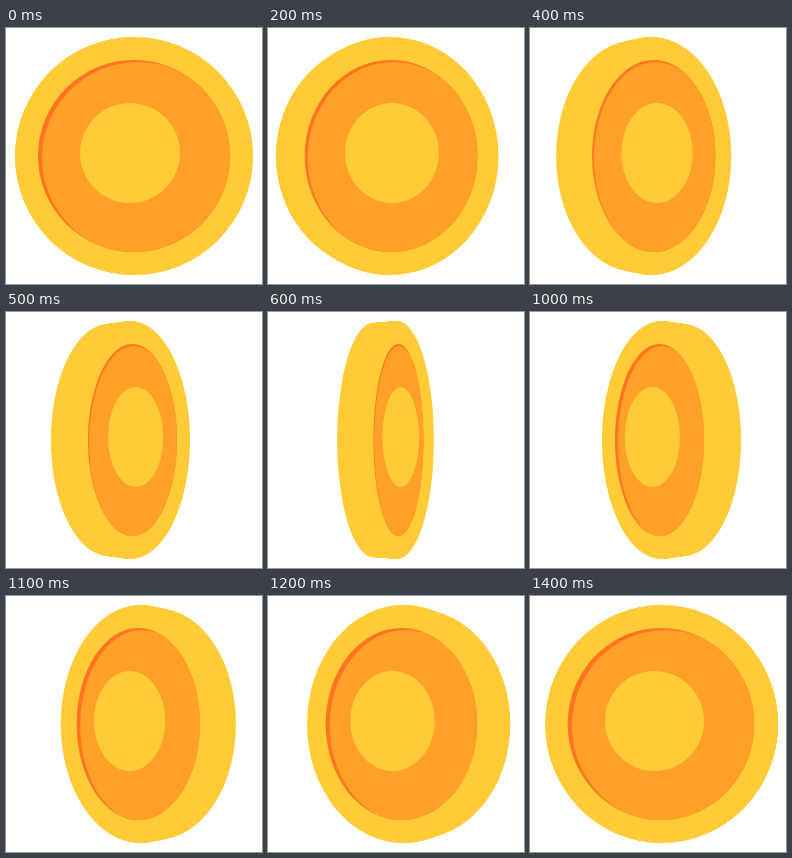
Write an HTML page with a canvas that moves like this. It is 256x256 px and loops after 1500 ms.

```html
<!DOCTYPE html>
<html lang="en">
<head>
<meta charset="utf-8">
<title>Spinning coin</title>
<style>
  html, body { margin: 0; width: 100%; height: 100%; overflow: hidden; background: #fff; }
  canvas { display: block; }
</style>
</head>
<body>
<canvas id="stage" width="256" height="256"></canvas>
<script>
const ctx = document.getElementById('stage').getContext('2d');
const GOLD = '#ffcb37', FLOOR = '#ffa028', SHADE = '#ff7420';
const CENTER = 128, RADIUS = 119, RECESS = 96, MARK = 50;
const THICKNESS = 25, SHRINK = 6, SLICES = 25;
const STEP = 100, STEPS = 15;

function ellipse(x, y, rx, ry, color) {
  ctx.beginPath();
  ctx.ellipse(x, y, rx, ry, 0, 0, 2 * Math.PI);
  ctx.fillStyle = color;
  ctx.fill();
}

function drawCoin(angle) {
  const c = Math.cos(angle), s = Math.sin(angle);
  const side = Math.sign(s), tilt = Math.abs(s);
  const front = CENTER - 13.5 * Math.sin(2 * angle) + 9.5 * s;

  ctx.clearRect(0, 0, 256, 256);

  // body: slices from back to front, smaller with distance
  for (let i = SLICES; i >= 0; i--) {
    const depth = i / SLICES, r = RADIUS - SHRINK * c * depth;
    ellipse(front - THICKNESS * s * depth, CENTER, r * c, r, GOLD);
  }

  // recess, partly hidden by the rim on both sides
  const near = 6.3 * tilt, far = 5 * tilt ** 8;
  const x = front + side * (near - far) / 2;
  const rx = RECESS * c - (near + far) / 2;
  ctx.save();
  ellipse(x, CENTER, rx, RECESS, SHADE);
  ctx.clip();
  ellipse(x + (4 - 2 * s) * c, CENTER + 2, rx, RECESS, FLOOR);
  ctx.restore();

  ellipse(x + (12 * s - 4) * c, CENTER - 3, MARK * c + 3 * tilt, MARK, GOLD);
}

function frame() {
  const step = Math.floor(performance.now() / STEP) % STEPS;
  const degrees = step * 180 / STEPS;
  drawCoin((degrees > 90 ? degrees - 180 : degrees) * Math.PI / 180);
  requestAnimationFrame(frame);
}
frame();
</script>
</body>
</html>
```
